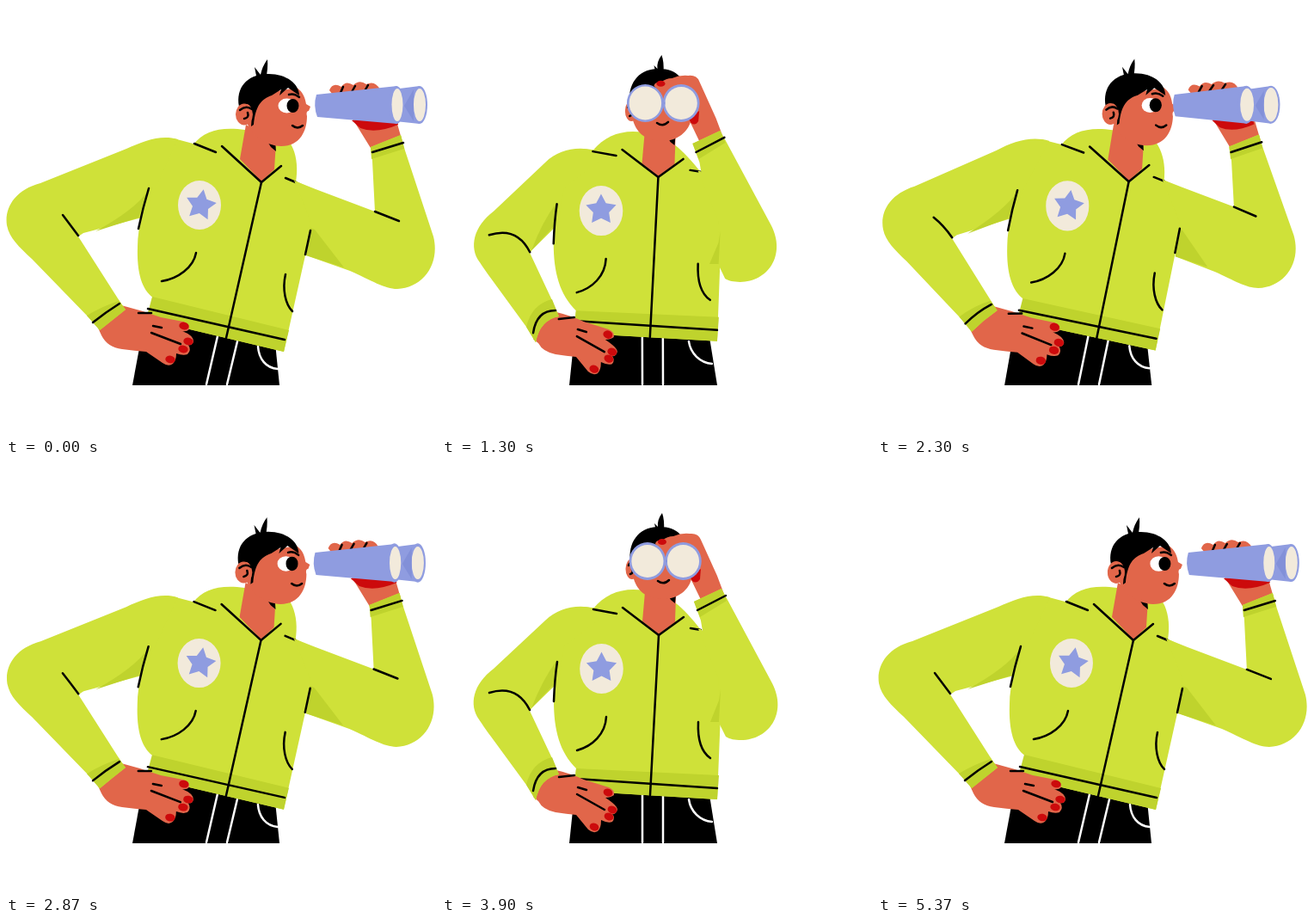
Write an HTML page that moves like this. It is 500x500 px and loops after 5.41 s.

```html
<!DOCTYPE html>
<html lang="en">
<head>
<meta charset="utf-8">
<title>Lookout</title>
<style>
  html, body { margin: 0; width: 100%; height: 100%; overflow: hidden; background: #fff; }
  svg { display: block; width: 100vw; height: 100vh; }
  path { fill: none; stroke-linecap: round; stroke-linejoin: round; }
  .lime { fill: #cfe139; }
  .shade { fill: #bfd32d; }
  .skin { fill: #e1664a; }
  .red { fill: #cc0a0c; }
  .black { fill: #000; }
  .blue { fill: #8f9ce0; }
  .dusk { fill: #8290d8; }
  .cream { fill: #f2eadb; }
  .white { fill: #fff; }
  .line { stroke: #000; stroke-width: 2.5; }
  .seam { stroke: #fff; stroke-width: 2.5; }
</style>
</head>
<body>
<svg id="stage" viewBox="0 0 500 500" xmlns="http://www.w3.org/2000/svg"></svg>
<script>
const LOOP = 5410, CYCLE = 81;
const stage = document.getElementById('stage');
const parts = [];

// A part morphs from its side pose to its front pose; it fades out over [from, to].
function part(cls, side, front, fade) {
  const el = document.createElementNS('http://www.w3.org/2000/svg', 'path');
  el.setAttribute('class', cls);
  stage.append(el);
  parts.push({ el, side, front: front.match(/-?[\d.]+/g).map(Number), fade });
}

function oval(cx, cy, rx, ry, tilt = 0) {
  const a = tilt * Math.PI / 180, dx = rx * Math.cos(a), dy = rx * Math.sin(a);
  const arc = (x, y) => `A${rx} ${ry} ${tilt} 1 1 ${x.toFixed(3)} ${y.toFixed(3)}`;
  return `M${(cx - dx).toFixed(3)} ${(cy - dy).toFixed(3)}${arc(cx + dx, cy + dy)}${arc(cx - dx, cy - dy)}Z`;
}

function star(cx, cy, r, tilt) {
  const pts = Array.from({ length: 10 }, (_, i) => {
    const a = (i * 36 - 90 + tilt) * Math.PI / 180, q = i % 2 ? r * 0.52 : r;
    return `${(cx + q * Math.cos(a)).toFixed(2)} ${(cy + q * Math.sin(a)).toFixed(2)}`;
  });
  return `M${pts.join('L')}Z`;
}

// trousers
part('black', 'M162 360L313 392L318 441L147 441Z', 'M156 365L311 385L320 441L148 441Z');
part('seam', 'M246 384L233 440M269 390L257 440', 'M233 385L233 440M257 386L257 440');
part('seam', 'M293 396C294 410 302 421 316 422', 'M287 390C289 404 300 415 314 416');

// hood and torso
part('lime', 'M218 161C230 145 250 140 278 144L310 143C332 150 342 175 337 205L297 215Z',
  'M176 168C190 150 212 143 235 147L272 162C279 167 292 181 301 193L252 215Z');
part('lime', 'M168 205C162 230 153 255 153 280C152 310 158 330 171 339L163 364L323 402L348 290L354 261L366 218L300 185L240 166L195 154Z',
  'M134 215C133 235 131 250 130 275C130 310 137 335 156 354L153 380L320 390L324 290L326 265L326 210L280 180L205 172L165 166Z');
part('shade', 'M170 338L329 377L323 402L163 364Z', 'M156 354L322 362L320 390L153 380Z');
part('line', 'M165 352L324 388', 'M156 366L320 377');

// neck and collar
part('skin', 'M279 138L272 178L297 204L312 190L314 158Z', 'M237 138L233 183L252 198L271 184L272 153Z');
part('black', 'M303 156L308 164L314 169L313 158Z', 'M262 151L266 158L271 162L272 151Z');
part('line', 'M251 163L297 205L320 186', 'M210 167L252 199L281 178');
part('line', 'M297 205L256 386', 'M252 199L242 385');

// badge and pockets
part('cream', oval(225, 231.5, 25, 28.5), oval(185.5, 238, 25.3, 29));
part('blue', star(226.5, 231.5, 18.5, 10), star(185.5, 237, 18.5, 0));
part('line', 'M181 320C200 317 218 304 221 287', 'M157 333C175 328 190 314 191 294');
part('line', 'M325 312C321 330 325 347 333 355', 'M298 300C297 320 302 335 312 342');

// hand on the hip
part('skin', 'M106 372Q118 360 134 348Q158 354 180 362L206 367Q214 370 213 376Q210 379 205 378Q218 383 218 390Q217 395 212 394Q216 400 211 405Q206 407 198 404Q198 412 194 416Q189 420 182 415L163 402Q150 401 135 399Q118 397 111 383Z',
  'M106 387Q112 362 133 356Q150 360 165 367L194 376Q201 379 200 385Q196 388 190 388Q204 397 204 402Q202 408 198 407Q202 411 198 416Q193 418 185 414Q185 424 181 427Q176 430 170 425L156 408Q145 407 132 405Q117 402 112 392Z');
[[207, 372, 193, 382], [212, 390, 198, 402], [206, 399, 194, 410], [191, 411, 177, 422]]
  .forEach(([x, y, u, v]) => part('red', oval(x, y, 5.7, 4.2, 10), oval(u, v, 5.5, 4.4, 22)));

// arm on the hip
part('lime', 'M200 155C180 149 160 157 140 166L40 206C10 214 -2 235 1 255C4 270 15 280 30 294L97 363L109 377Q124 365 139 353L130 340L84 268L90 264L158 246L174 212Z',
  'M195 172C165 162 140 163 120 182L60 238C36 256 31 280 43 297C45 300 51 309 57 317L98 373L109 391Q114 365 136 361L127 340L102 287L105 283L136 253L142 212Z');
part('shade', 'M166 214Q150 237 104 262L154 246L160 230Z', 'M134 228Q117 250 104 284L131 255L133 240Z');
part('shade', 'M94 360Q112 349 131 343L139 353Q124 365 109 377Z', 'M98 373Q104 347 128 341L136 361Q114 365 109 391Z');
part('line', 'M66 243Q75 255 84 267', 'M55 266Q87 256 102 286');
part('line', 'M166 212Q159 235 154 259', 'M134 230Q131 250 130 276');
part('line', 'M101 368Q116 356 132 346', 'M106 380Q110 354 132 354');
part('line', 'M154 357L169 357M171 372L181 374M169 380L203 393', 'M136 364L154 362M158 376L168 379M157 384L189 402');
part('line', 'M219 160L244 170M325 200L337 205', 'M176 169L203 174M289 191L301 193');

// head
part('skin', 'M280 105L338 95C346 100 348 108 349 114L354 117L352 122C350 122 349 124 350 128C350 145 342 163 320 163C300 162 285 150 280 135Z',
  'M222 100L290 95C292 100 292 105 292 112L292 117L292 122C292 124 291 126 291 130C288 148 272 158 255 157C238 156 226 148 222 130Z');
part('white', oval(326.5, 116, 10, 8.5), oval(241, 111, 7, 8.5));
part('black', oval(333.5, 116, 7, 8), oval(244, 110, 7.5, 8));
part('line', 'M329 103Q335 101 341 106', 'M244 97Q252 91 260 96');
part('line', 'M333 139Q339 144 345 139', 'M251 136Q258 141 264 135');
part('black', 'M271 117C267 95 280 80 303 79C325 78 341 90 341 104L328 95L318 104L320 97L309 104C297 108 290 116 288 138L285 140C286 128 288 118 281 114Z',
  'M219 114C216 92 228 74 250 73C275 72 283 85 284 103L272 97L262 102L262 97L250 102C237 103 230 108 226 125L225 128C225 118 226 112 222 110Z');
part('black', 'M292 86L289 71L296 80Q298 70 304 62Q305 72 302 86Z', 'M249 78L247 69L251 73Q250 65 256 57Q259 65 258 78Z');
part('skin', oval(277, 126, 10, 12.5), oval(221, 122, 7.5, 12));
part('line', 'M272 121Q279 115 286 120M277 131Q283 130 281 124', 'M217 118Q219 113 222 116M219 128Q223 127 221 122');

// raised hand
part('skin', 'M427 170L406 136L376 98Q380 88 390 94Q395 86 404 92Q411 85 419 91Q429 86 435 97L453 130L461 158Z',
  'M304 164L290 135L248 93Q249 88 256 89Q262 84 269 84Q278 80 288 81Q298 80 301 88L320 130L329 154Z');
part('line', 'M392 94L389 101M406 93L402 100M421 92L417 99', 'M264 87L254 93M273 85L262 92M280 83L270 90', [0.4, 0.7]);
part('red', oval(383, 112, 5, 4), oval(256, 90.5, 5, 3.6));
part('red', 'M402 133L412 142Q430 149 456 138L454 130Z', 'M288 130L291 136Q296 140 300 134L301 122Z');

// raised arm
part('lime', 'M335 203L360 213L429 239L426 180L424 164L459 150L464 168L497 268C505 300 485 328 455 329C440 329 425 319 400 308L349 290L354 250Z',
  'M298 192L301 192L303 194L301 182L293 160L325 145L331 156L384 255C402 290 380 321 348 321C340 321 335 320 330 317L322 301L322 250Z');
part('shade', 'M359 260L393 304L349 290L354 258Z', 'M322 275L312 300L322 300L324 262Z');
part('line', 'M354 261L348 289', 'M328 243L326 273', [0.82, 0.95]);
part('line', 'M429 239L457 250', 'M303 194L310 204', [0.35, 0.5]);
part('shade', 'M425 178L424 164L459 150L463 166Z', 'M300 178L293 160L325 145L331 159Z');
part('line', 'M426 170L462 159', 'M297 170L330 153');

// binoculars
part('blue', 'M395 104Q391 116 396 128L481 137L481 93Z', 'M270 104Q268 113 270 122L281 134L281 92Z');
part('blue', oval(481, 115, 9, 22), oval(280.5, 113, 21.3, 22));
part('cream', oval(481, 115, 7, 19), oval(280.5, 113, 18.6, 19));
part('dusk', 'M463 116L474 97L474 134Z', 'M260 113L262 111L262 115Z');
part('blue', 'M361 103Q357 116 362 129L455 137L455 93Z', 'M225 104Q223 113 226 122L239 134L239 92Z');
part('blue', oval(454, 115, 9, 22), oval(239, 113, 21.3, 22));
part('cream', oval(455, 115, 6.5, 19), oval(239, 113, 18.6, 19));

// cubic-bezier(.66, 0, .34, 1)
function ease(x) {
  let lo = 0, hi = 1;
  for (let i = 0; i < 24; i++) {
    const u = (lo + hi) / 2, v = 1 - u;
    if (3 * v * v * u * 0.66 + 3 * v * u * u * 0.34 + u * u * u < x) lo = u; else hi = u;
  }
  return lo * lo * (3 - 2 * lo);
}

function draw(now) {
  // 30 steps a second, on a 10 ms grid
  const step = Math.floor((Math.floor(now % LOOP / 10) + 0.5) * 0.3);
  const phase = (step - 0.5 + CYCLE) % CYCLE / (CYCLE / 2);
  const turn = ease(phase > 1 ? 2 - phase : phase) / 0.986;
  for (const { el, side, front, fade } of parts) {
    let i = 0;
    el.setAttribute('d', side.replace(/-?[\d.]+/g, n => +(+n + (front[i++] - n) * turn).toFixed(2) + ' '));
    if (fade) el.style.opacity = Math.min(1, Math.max(0, (fade[1] - turn) / (fade[1] - fade[0])));
  }
}

function tick(now) {
  draw(now);
  requestAnimationFrame(tick);
}
draw(0);
requestAnimationFrame(tick);
</script>
</body>
</html>
```
